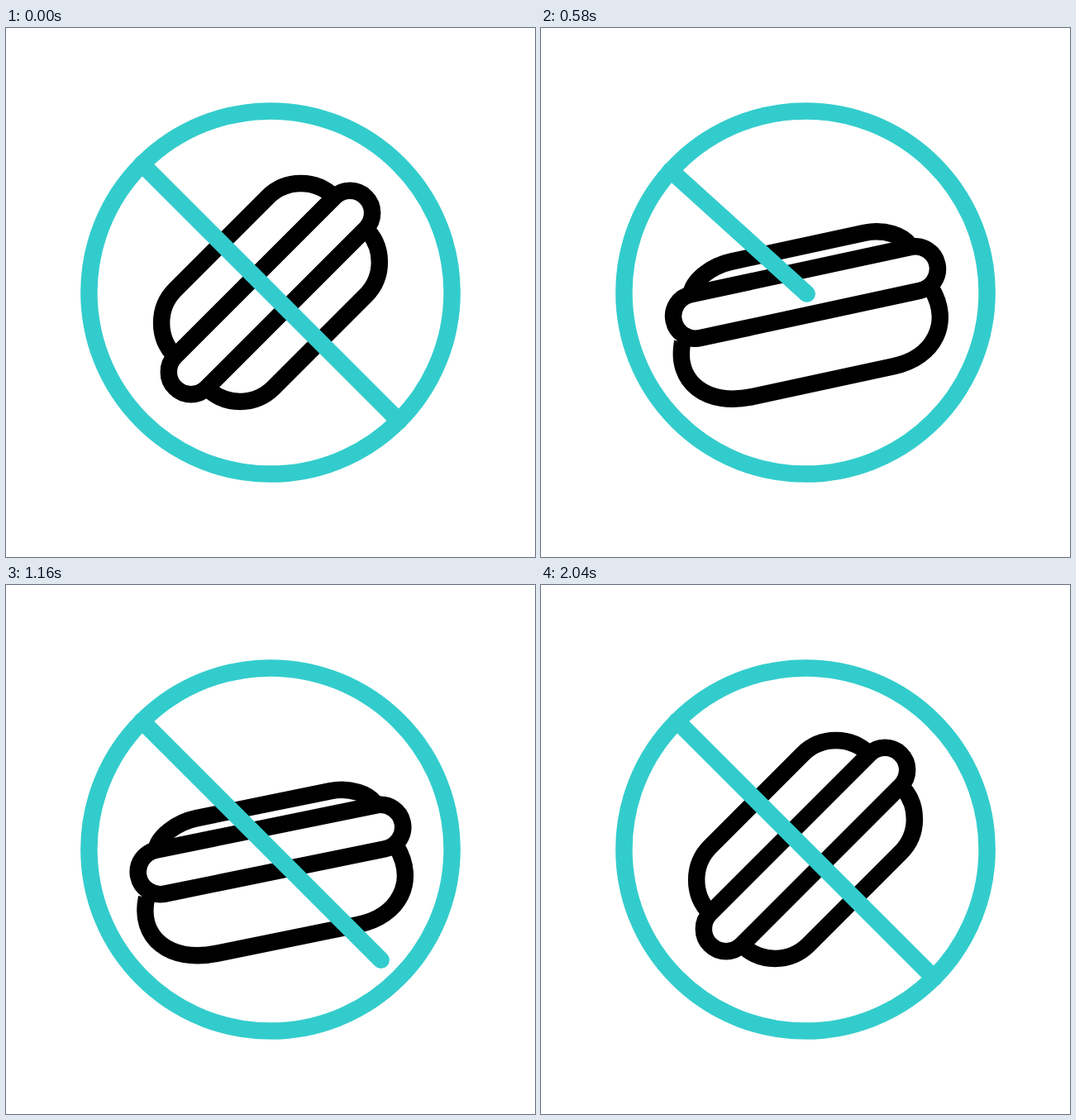
Recreate the animation shown at these times as an HTML page. Size 640x640 px, loop 2400 ms.

```html
<!DOCTYPE html>
<html lang="en">
<head>
<meta charset="utf-8">
<title>No hot dogs</title>
<style>
  html, body { margin: 0; width: 100%; height: 100%; overflow: hidden; background: #fff; }
  svg { display: block; width: 100vw; height: 100vh; }
</style>
</head>
<body>
<svg viewBox="-320 -320 640 640" fill="none" stroke-width="20.5">
  <g id="hotdog" stroke="#000">
    <path id="topBun" transform="scale(1 -1)"/>
    <path id="lowBun"/>
    <rect x="-163" y="-27" width="326" height="54" rx="27" fill="#fff"/>
  </g>
  <g stroke="#33cccc">
    <line id="bar" stroke-linecap="round"/>
    <circle r="219.6"/>
  </g>
</svg>
<script>
const LOOP = 2400;
const STEP = 20;
const RADIUS = 220;
const SAUSAGE = 27;
const ROUND = .55;
const [hotdog, topBun, lowBun, bar] =
  ['hotdog', 'topBun', 'lowBun', 'bar'].map(id => document.getElementById(id));

const clamp = x => Math.min(1, Math.max(0, x));
const mix = (a, b, x) => a + (b - a) * x;

function easeInOut(x, power) {
  x = clamp(x);
  return x < .5 ? (2 * x) ** power / 2 : 1 - (2 - 2 * x) ** power / 2;
}

// Rises from 0 to 1 and falls back within the duration
const bump = (t, start, duration) => Math.sin(Math.PI * clamp((t - start) / duration));

// A bun end: where it meets the sausage, where its straight edge starts, how far it swells
const roundEnd = { foot: 136, shoulder: 79, bulge: 0 };
const topShape = {
  height: 53,
  left: { foot: 136, shoulder: 80, bulge: -6 },
  right: { foot: 136, shoulder: 86, bulge: -5 }
};
const lowShape = {
  height: 112,
  left: { foot: 160, shoulder: 90, bulge: 21 },
  right: { foot: 151, shoulder: 86, bulge: 17 }
};

function bunPath(shape, tilt) {
  const height = mix(84, shape.height, tilt);
  const corner = (end, side) => {
    const [foot, shoulder, bulge] =
      ['foot', 'shoulder', 'bulge'].map(key => side * mix(roundEnd[key], end[key], tilt));
    return [
      [foot, SAUSAGE],
      [foot + bulge, mix(SAUSAGE, height, ROUND)],
      [mix(shoulder, foot, ROUND) + bulge, height],
      [shoulder, height]
    ];
  };
  const [start, ...left] = corner(shape.left, -1);
  const [edge, ...right] = corner(shape.right, 1).reverse();
  return `M${start}C${left}L${edge}C${right}`;
}

function draw(t) {
  const tilt = easeInOut(t / 835, 3.7) - easeInOut((t - 850) / 1145, 3.4);
  hotdog.setAttribute('transform', `rotate(${mix(-45, -9.3, tilt)})`);
  topBun.setAttribute('d', bunPath(topShape, tilt));
  lowBun.setAttribute('d', bunPath(lowShape, tilt));

  // Two turns that settle, while each end of the bar draws back once
  const turnLeft = 720 * Math.exp(-((t / 523.6) ** 3.08));
  bar.setAttribute('transform', `rotate(${45 - turnLeft})`);
  bar.setAttribute('x1', RADIUS * (1.292 * bump(t, 0, 803) - 1));
  bar.setAttribute('x2', RADIUS * (1 - .33 * bump(t, 700, 535)));
}

function tick() {
  const now = performance.now() % LOOP;
  draw(now - now % STEP);
  requestAnimationFrame(tick);
}
tick();
</script>
</body>
</html>
```
